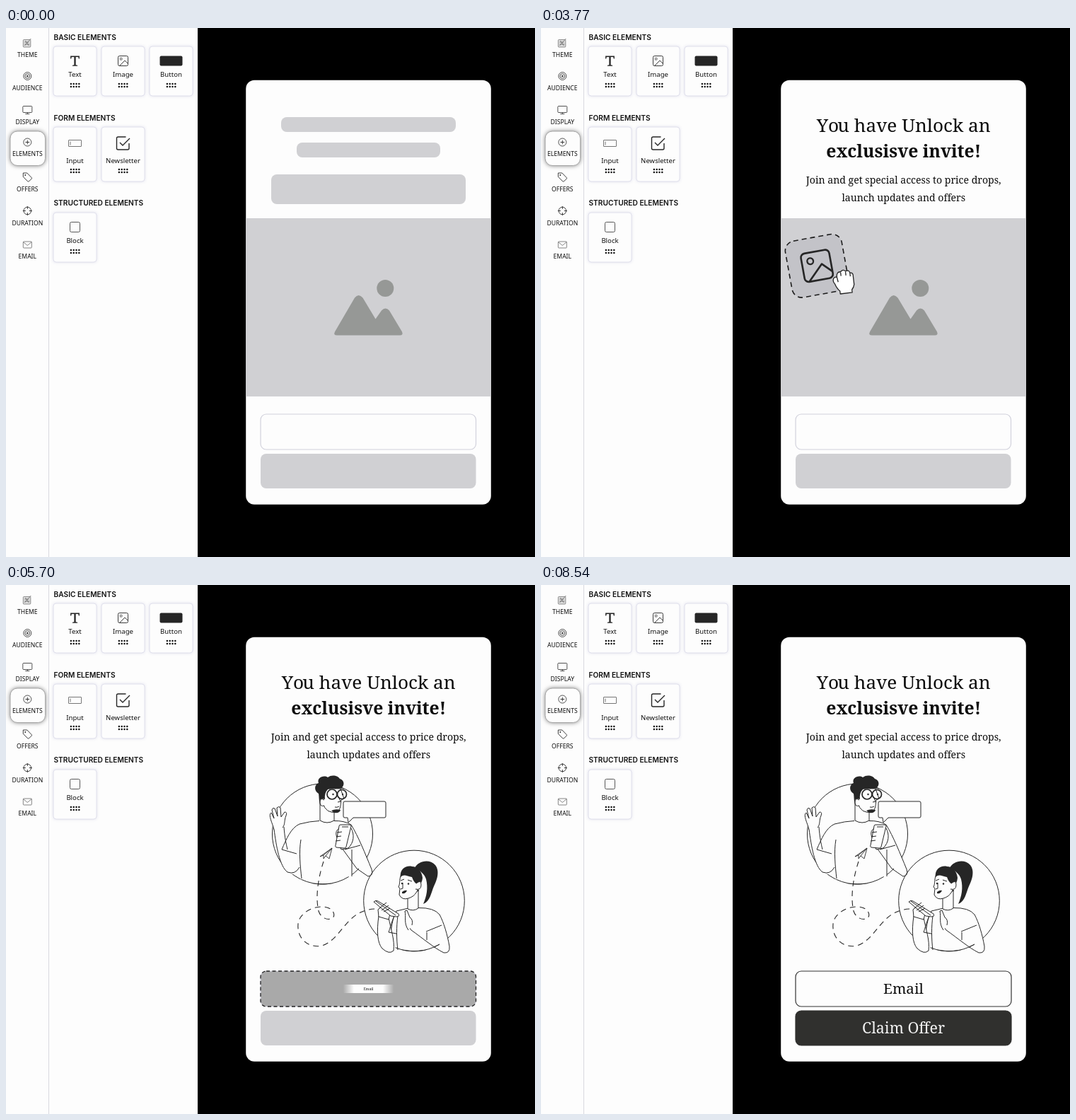
Write an HTML page with a canvas that moves like this. It is 748 px wide and 748 px high and loops after 8.58 s.

```html
<!DOCTYPE html>
<html lang="en">
<head>
<meta charset="utf-8">
<title>Drag and drop editor</title>
<style>
html, body { margin: 0; width: 100%; height: 100%; overflow: hidden; background: #000; }
canvas { display: block; width: 748px; height: 748px; }
</style>
</head>
<body>
<canvas id="stage" width="748" height="748"></canvas>
<script>
const ctx = document.getElementById('stage').getContext('2d');
const LOOP = 8580, PAPER = '#fdfdfd', INK = '#262626', BAR = [208, 208, 211], HOT = [169, 169, 169];
const SANS = '"Noto Sans", "Open Sans", sans-serif', SERIF = '"Noto Serif", serif', HEAD = 'Inter, sans-serif';

const ramp = (t, a, b) => Math.min(1, Math.max(0, (t - a) / (b - a)));
const ease = p => p < .5 ? 2 * p * p : 1 - 2 * (1 - p) * (1 - p);
const mix = (a, b, p) => a + (b - a) * p;
const blend = (a, b, p) => `rgb(${a.map((v, i) => Math.round(mix(v, b[i], p)))})`;

function paint(fill, stroke, width = 1) {
  if (fill) { ctx.fillStyle = fill; ctx.fill(); }
  if (stroke) { ctx.strokeStyle = stroke; ctx.lineWidth = width; ctx.stroke(); }
}
function box(x, y, w, h, r, fill, stroke, width) {
  ctx.beginPath(); ctx.roundRect(x, y, w, h, r); paint(fill, stroke, width);
}
function disc(x, y, r, fill, stroke, width) {
  ctx.beginPath(); ctx.arc(x, y, r, 0, 7); paint(fill, stroke, width);
}
function shape(d, fill, stroke, width = 1) {
  const p = new Path2D(d);
  if (fill) { ctx.fillStyle = fill; ctx.fill(p); }
  if (stroke) { ctx.strokeStyle = stroke; ctx.lineWidth = width; ctx.stroke(p); }
}
function label(s, x, y, font, color = '#111', align = 'center') {
  ctx.font = font; ctx.fillStyle = color; ctx.textAlign = align; ctx.fillText(s, x, y);
}
function at(x, y, fn, scale = 1, angle = 0, alpha = 1) {
  ctx.save();
  ctx.translate(x, y); ctx.rotate(angle); ctx.scale(scale, scale);
  ctx.globalAlpha *= alpha;
  fn();
  ctx.restore();
}

// Element icons, centred on 0,0
const icons = {
  text: () => shape('M-6.4-7H6.4V-2.9H5.3L4.7-5.5H1.15V5.8L3.6 6.2V7.2H-3.6V6.2L-1.15 5.8V-5.5H-4.7L-5.3-2.9H-6.4Z', INK),
  image() {
    box(-7, -7, 14, 14, 2, null, INK, .9);
    disc(-2.8, -2.8, 1.5, null, INK, .8);
    shape('M-5 7L2.5-.5 7 4', null, INK, .9);
  },
  button: () => box(-16, -7, 32, 14, 2, INK),
  input() { box(-9, -4.5, 18, 9, .5, null, '#555', .8); shape('M-6.5-2.5V2.5', null, '#555', .8); },
  check: () => shape('M8.5 0V7Q8.5 9 6.5 9H-7Q-9 9-9 7V-7Q-9-9-7-9H4M-4.5-1L-.5 3 9.5-7', null, INK, 1.4),
  block: () => box(-7, -7, 14, 14, 2, null, '#444', .9)
};

const nav = [
  ['THEME', 21, 38, () => {
    box(-6, -4.5, 10.5, 10.5, 1, '#ddd', '#777', .8);
    shape('M-4 4L5-6M-4-1H2M-4 2H3M-3-3L2 4', null, '#666', .8);
  }],
  ['AUDIENCE', 68, 85, () => { disc(0, 0, 5.5, null, INK, .8); disc(0, 0, 3.4, null, INK, .8); disc(0, 0, 1.5, '#555'); }],
  ['DISPLAY', 115.5, 132.7, () => { box(-6.5, -5, 13, 9, 1, null, INK, .8); shape('M0 4V6M-3 6H3', null, INK, .8); }],
  ['ELEMENTS', 161.5, 178, () => { disc(0, 0, 5.5, null, INK, .8); shape('M-2.8 0H2.8M0-2.8V2.8', null, INK, .9); }],
  ['OFFERS', 211, 227.5, () => { shape('M-6-6H-.5L6 .8Q6.5 1.5 6 2L2 6Q1.3 6.5.6 6L-6-.5Z', null, INK, .9); disc(-3, -3, .9, INK); }],
  ['DURATION', 258.5, 275.3, () => { disc(0, 0, 5.3, null, INK, .9); shape('M0-6.5V-2.5M0 2.5V6.5M-6.5 0H-2.5M2.5 0H6.5', null, INK, .9); }],
  ['EMAIL', 306.5, 323, () => { box(-6, -4.5, 12, 9, 1, null, '#666', .8); shape('M-6-4L0 1 6-4', null, '#666', .8); }]
];

const cards = [
  ['Text', 'text', 67, 26, 70], ['Image', 'image', 135, 26, 70], ['Button', 'button', 203, 26, 70],
  ['Input', 'input', 67, 140, 77], ['Newsletter', 'check', 135, 140, 77], ['Block', 'block', 67, 261, 70]
];

function shadowBox(x, y, w, h, r, blur, color, edge) {
  ctx.save();
  ctx.shadowColor = color; ctx.shadowBlur = blur;
  box(x, y, w, h, r, PAPER);
  ctx.restore();
  box(x, y, w, h, r, null, edge, 1);
}

function panel() {
  ctx.fillStyle = PAPER; ctx.fillRect(0, 0, 271, 748);
  ctx.fillStyle = '#d9d9e0'; ctx.fillRect(60, 0, 1, 748);
  shadowBox(6, 146, 49.5, 48.5, 10, 6, 'rgba(0,0,0,.55)', '#a8a8a8');
  for (const [name, iy, ty, draw] of nav) {
    at(30.3, iy, draw);
    label(name, 30.3, ty + .8, `8.6px ${SANS}`);
  }
  [['BASIC ELEMENTS', 13], ['FORM ELEMENTS', 127], ['STRUCTURED ELEMENTS', 247]]
    .forEach(([s, y]) => label(s, 67.5, y + .6, `600 10.2px ${HEAD}`, '#111', 'left'));
  for (const [name, icon, x, y, h] of cards) {
    const cx = x + 30.5, tall = h > 70;
    shadowBox(x, y, 61, h, 4, 4, 'rgba(110,110,170,.25)', '#e0e0ec');
    at(cx, y + (tall ? 23 : 20.5), icons[icon]);
    label(name, cx, y + (tall ? 48 : 40), `9.6px ${SANS}`);
    for (let i = 0; i < 8; i++)
      disc(cx - 5.6 + i % 4 * 3.8, y + h - 17 + (i > 3 ? 4 : 0), 1.25, '#111');
  }
}

// A placeholder that turns grey and dashed while an element hovers over it
function slot(x, y, w, h, r, hot, alpha, outline) {
  if (alpha <= 0) return;
  ctx.save();
  ctx.globalAlpha *= alpha;
  box(x, y, w, h, r, blend(outline ? [253, 253, 253] : BAR, HOT, hot), outline && '#d2d2dc', 1.2);
  if (hot > 0) {
    ctx.globalAlpha *= hot;
    ctx.setLineDash([5, 3.5]);
    box(x, y, w, h, r, null, '#222', 1.3);
  }
  ctx.restore();
}

function mountains() {
  disc(536.3, 368, 12, '#969896');
  shape('M468 434.5Q462.500 434.500 465 429.500L493 381.500Q498.500 374.500 504.500 381.500L522.500 411.500 531 399.500Q536.500 393.500 542 399.500L560 429.500Q562 434.500 557 434.500Z', '#969896');
}

function man() {
  disc(447.5, 352, 71, null, INK);
  shape('M390 374C396 360 403 343 415 338Q430 334 443 333.500L464 333.500Q480 334 490 341C499 358 508 380 517 404Q518 411 511 411L497 399 489 391V422H417L416 402Q409 412 399 407C389 402 386 386 379 345L393 341C394 360 398 374 400 380Z', PAPER);
  shape('M443 333.500Q430 334 415 338C403 343 396 360 390 374L411 380M417 360C414 377 416 397 418 415', null, INK);
  shape('M379 345C382 369 387 398 398 406Q409 410 415 399M393 342C394 356 396 366 398 374', null, INK);
  shape('M379 346C377 337 370 325 375 322L379 330 376 318Q377 314 380 316L384 327 383 315Q386 312 388 315L389 328 394 321Q398 321 396 326C393 333 395 339 391 343', PAPER, INK);
  shape('M464 333.500Q478 333 488 339C498 355 508 380 517 402Q520 411 512 412L496 401 475 372M489 374V412M479 374L501 368', null, INK);
  ctx.beginPath(); ctx.arc(447.5, 352, 71, 1.02, 2.01); paint(null, INK);
  shape('M444 306V333Q454 339 464 333V322Z', PAPER, INK);
  shape('M448 286V308Q452 324 468 321C474 317 473 309 474 304L478 302 473 288Z', PAPER, INK);
  shape('M445 312C442 306 443 301 442 295C435 291 436 282 442 280C439 273 449 268 455 272C461 267 470 270 472 274C479 276 479 284 474 287C467 290 460 287 455 289Q450 294 451 303L447 302Z', INK);
  shape('M450 304Q444 300 444 307T450 312', PAPER, INK);
  shape('M460 319Q466 316 473 318Q472 323 464 322Z', INK);
  shape('M465 314Q468 315 471 313', null, INK);
  disc(461, 296, 7, null, INK, 1.7);
  disc(475, 296, 6.5, null, INK, 1.7);
  disc(462.5, 296, 1.2, INK); disc(476, 296, 1.2, INK);
  shape('M457 288L464 287M472 287L478 288M470 299L473 306 469 307', null, INK);
  shape('M479 306H535Q537 306 537 308V327Q537 329 535 329H491L484 336 483 329H479Q477 329 477 327V308Q477 306 479 306Z', PAPER, INK);
  shape('M468 357C464 348 470 342 477 344L488 344C493 353 492 364 484 372L474 374Z', PAPER, INK);
  shape('M473 339H486Q488 339 488 341L481 370Q480 373 478 372L467 371Q465 370 466 368L471 341Q471 339 473 339Z', PAPER, INK);
  shape('M475 342H484M468 350L475 349M467 356L474 355M466 362L473 361', null, INK);
}

function woman() {
  disc(577, 446.5, 71.3, null, INK);
  shape('M569 457L551 462C545 476 543 492 545 516H608L596 497V488L609 499 619 520Q628 520 627 510C623 488 621 464 602 459L583 456Z', PAPER);
  shape('M569 457L552 461C546 472 544 488 544 499M583 456.500Q605 456 613 466C619 477 624 494 627 511Q628 521 619 520C605 513 590 500 573 488L567 480M594 490L616 481M595 491V502', null, INK);
  shape('M527 468C524 490 525 506 532 514Q542 523 548 517C550 502 544 487 541 470', PAPER, INK);
  shape('M552 462C545 475 543 486 541 491L552 493M554 468C552 482 552 501 554 516', null, INK);
  ctx.beginPath(); ctx.arc(577, 446.5, 71.3, 1.05, 1.95); paint(null, INK);
  shape('M527 469L526 459 533 453 544 461 541 473Z', PAPER, INK);
  shape('M520 448Q523 445 526 447L555 465Q557 469 552 469L544 468Z', PAPER, INK);
  shape('M523 447L551 467M528 457L538 449M531 460L541 453M534 462L543 457', null, INK);
  shape('M569 488C562 478 566 470 564 461L567 460 571 470Q576 473 574 481', PAPER, INK);
  shape('M568 440V458Q576 462 583 457V432Z', PAPER, INK);
  shape('M560 406C555 417 558 421 555 427L557 429 556 438Q560 446 569 443C580 440 584 430 585 418L576 406Z', PAPER, INK);
  shape('M558 413C556 402 566 396 574 398C581 398 588 404 589 414Q588 424 583 424Q577 422 574 413C567 412 563 408 558 413Z', INK);
  shape('M578 400C582 391 598 386 607 396C614 405 609 418 605 426C601 435 600 447 590 451C595 440 597 428 594 416C592 409 586 404 578 400Z', INK);
  shape('M580 422Q587 416 587 424T579 430', PAPER, INK);
  shape('M558 418L563 416M568 417L574 419M561 421V429L558 430', null, INK);
  disc(560, 422, 1.2, INK); disc(569, 422.5, 1.2, INK);
  shape('M560 434Q564 431 567 432 565 437 560 436Z', INK);
  disc(583, 432, 1, INK);
}

function picture() {
  man();
  woman();
  shape('M444 384L461 372 457 387 452 383 449 387 449 382ZM449 382L461 372 452 383', PAPER, INK, .9);
  ctx.setLineDash([8, 6]);
  shape('M449 391C442 412 437 440 442 461C447 477 468 475 463 463C456 447 416 456 413 479C411 502 430 514 447 510C475 501 481 459 522 458', null, INK, 1.1);
  ctx.setLineDash([]);
}

const lines = [
  ['You have Unlock an', 146.5, `26.2px ${SERIF}`],
  ['exclusisve invite!', 182.5, `bold 24.7px ${SERIF}`],
  ['Join and get special access to price drops,', 219.5, `14.1px ${SERIF}`],
  ['launch updates and offers', 245, `14.1px ${SERIF}`]
];

function typed(t) {
  let n = 0;
  ctx.textBaseline = 'alphabetic';
  for (const [s, y, font] of lines) {
    ctx.font = font;
    const left = 512.7 - ctx.measureText(s).width / 2;
    for (let i = 0; i < s.length; i++, n++) {
      const start = 1220 + n * 17.8;
      ctx.globalAlpha = ramp(t, start, start + 40);
      if (ctx.globalAlpha) label(s[i], left + ctx.measureText(s.slice(0, i)).width, y, font, '#0c0c0c', 'left');
    }
  }
  ctx.globalAlpha = 1;
  ctx.textBaseline = 'middle';
}

// A finished field growing from its centre, with soft ends while small
function field(text, y, h, p, rgb, ink, edge, size) {
  if (p <= 0) return;
  const s = ease(p), soft = .28 * (1 - s);
  at(512.5, y + h / 2, () => {
    let fill = `rgb(${rgb})`;
    if (s < 1) {
      fill = ctx.createLinearGradient(-152, 0, 152, 0);
      [[0, 0], [soft, 1], [1 - soft, 1], [1, 0]].forEach(([k, a]) => fill.addColorStop(k, `rgba(${rgb},${a})`));
    }
    box(-152.5, -h / 2, 305, h, 8, fill);
    ctx.save();
    ctx.globalAlpha = ramp(s, .5, 1);
    box(-152.5, -h / 2, 305, h, 8, null, edge, 1.2);
    ctx.restore();
    label(text, 0, 1, `${size}px ${SERIF}`, ink);
  }, s);
}

const fist = () => shape('M-13 2C-17-4-13-9-9-7Q-9-15-3-14Q1-18 4-14Q9-16 10-11Q15-11 14-5L14 6Q13 10 10 13V17H-7V13Q-11 9-13 2ZM-9-7L-8 0M-3-13V-8M4-13V-8M10-11V-6', '#fff', '#222', 1.3);
function pointer() {
  const g = ctx.createLinearGradient(0, -10, 0, 22);
  g.addColorStop(0, '#fff'); g.addColorStop(.5, '#f0f0f0'); g.addColorStop(1, '#8e8e8e');
  shape('M-11-21Q-7-25-4-20L-2-9Q2-12 5-8Q9-10 11-6Q15-6 15-1L15 10 11 22H-5L-13 6Q-17-1-12-1L-8 2Z', g, 'rgba(90,90,90,.5)', .8);
}

// icon, pick-up point, drop point, start, arrival, release, icon scale
const drags = [
  ['text', 97, 46, 397.5, 148.5, 350, 950, 1120, 2.9],
  ['image', 165, 50, 397, 345, 3200, 3850, 4050, 2.9],
  ['input', 97, 163, 380.5, 571, 4720, 5330, 5480, 3],
  ['button', 233, 46, 380.5, 575, 6500, 7150, 7340, 2.2]
];

function drag(t, [icon, x0, y0, x1, y1, start, end, drop, zoom]) {
  const alpha = ramp(t, start - 100, start) * (1 - ramp(t, drop, drop + 140));
  if (!alpha) return;
  const p = ease(ramp(t, start, end)), x = mix(x0, x1, p), y = mix(y0, y1, p);
  const last = icon === 'button';
  at(x, y, () => {
    ctx.setLineDash([7, 5]);
    box(-40.5, -40.5, 81, 81, 14, 'rgba(194,194,199,.9)', '#1c1c1c', 1.6);
    ctx.setLineDash([]);
    at(0, 0, icons[icon], zoom);
  }, 1, -.185 * p, alpha);
  at(x + (last ? 47 : 38), y + (last ? 27 : 22), last ? pointer : fist, 1, last ? -.1 : -.12, alpha);
}

function render(t) {
  ctx.setTransform(1, 0, 0, 1, 0, 0);
  ctx.globalAlpha = 1;
  ctx.textBaseline = 'middle';
  ctx.lineJoin = 'round';
  ctx.fillStyle = '#000'; ctx.fillRect(0, 0, 748, 748);
  panel();
  box(339.2, 73.8, 346.6, 600, 12, PAPER);

  const hot = drags.map(d => ramp(t, d[6] - 80, d[6] + 110));
  const gone = 1 - ramp(t, 1120, 1240);
  slot(389, 126, 247, 21, 8, hot[0], gone);
  slot(411, 162, 203, 21, 8, hot[0], gone);
  slot(375, 207, 275, 42, 8, hot[0], gone);
  typed(t);

  const shown = ramp(t, 4130, 4490), faded = (1 - shown) ** 1.5;
  slot(339.2, 269, 346.6, 252, 0, hot[1], faded);
  ctx.globalAlpha = faded;
  if (shown < 1) mountains();
  ctx.globalAlpha = shown;
  if (shown) picture();
  ctx.globalAlpha = 1;

  const mail = ramp(t, 5550, 5990), claim = ramp(t, 7480, 7920);
  slot(360, 546, 304.5, 50, 8, hot[2], 1 - ramp(mail, .7, 1), true);
  field('Email', 546, 50, mail, '253,253,253', '#0c0c0c', '#333', 20.6);
  slot(360, 602, 304.5, 49, 8, hot[3], 1 - ramp(claim, .7, 1));
  field('Claim Offer', 602, 49, claim, '48,48,46', '#f4f4f4', '#30302e', 21.4);

  drags.forEach(d => drag(t, d));
}

const begin = performance.now();
function tick() {
  render((performance.now() - begin) % LOOP);
  requestAnimationFrame(tick);
}
tick();
</script>
</body>
</html>
```
